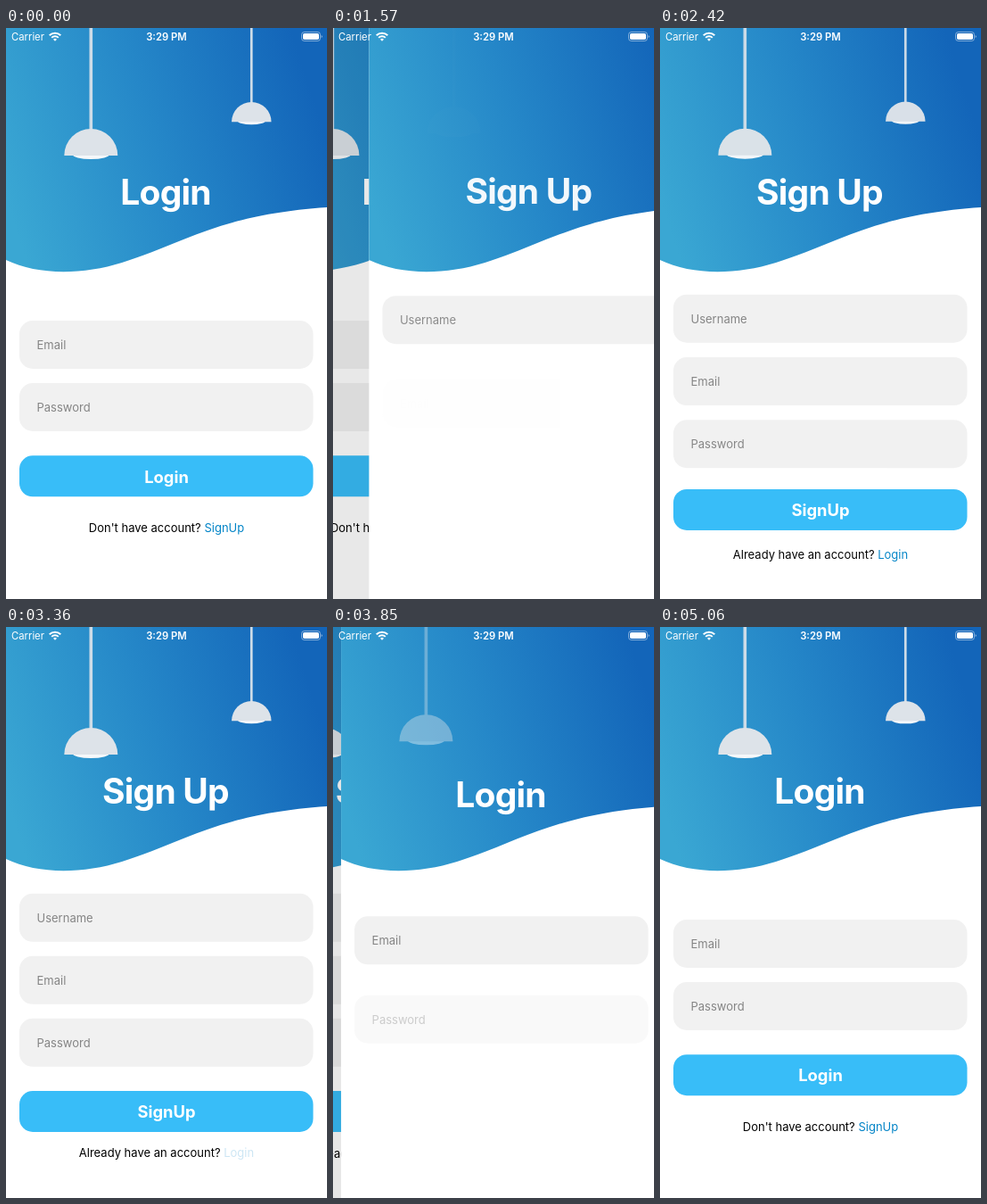
An HTML page for the animation above (5.11 s loop, 360 px wide and 640 px high).

```html
<!DOCTYPE html>
<html lang="en">
<head>
<meta charset="utf-8">
<title>Login and sign up</title>
<style>
  html, body { margin: 0; height: 100%; overflow: hidden; background: #fff; }
  svg { display: block; width: 100%; height: 100%; font: 13px Inter, "Noto Sans", sans-serif; }
  .middle { text-anchor: middle; }
  .title { font-size: 39px; font-weight: 700; letter-spacing: -.8px; fill: #fff; }
  .button { font-size: 18.4px; font-weight: 700; fill: #fff; }
  .placeholder { fill: #858585; }
  .link { fill: #0284c7; }
  .status { font-size: 11.3px; fill: #fff; }
</style>
</head>
<body>
<svg id="stage" viewBox="0 0 360 640">
  <defs>
    <linearGradient id="sky" gradientUnits="userSpaceOnUse" x1="0" y1="190" x2="345" y2="80">
      <stop offset="0" stop-color="#3aa7d3"/>
      <stop offset=".5" stop-color="#2587c8"/>
      <stop offset="1" stop-color="#1365b9"/>
    </linearGradient>
    <g id="shade">
      <ellipse cy="28.5" rx="21" ry="5.5" fill="#f6f8fa"/>
      <path d="M-30 30A30 30 0 0 1 30 30Z" fill="#dde3e9"/>
    </g>
  </defs>
  <g id="pages"></g>
  <g class="status">
    <text x="6" y="14">Carrier</text>
    <text class="middle" x="180" y="14" font-weight="600">3:29 PM</text>
    <g fill="none" stroke="#fff" stroke-width="2">
      <path d="M48.7 8.3a9 9 0 0 1 12.6 0M51.2 10.9a5.4 5.4 0 0 1 7.6 0"/>
    </g>
    <path d="M55 14.8l-2-2.1a2.9 2.9 0 0 1 4 0z"/>
    <rect x="331.5" y="4.5" width="21" height="10" rx="3" fill="none" stroke="#fff" stroke-opacity=".45"/>
    <rect x="333" y="6" width="18" height="7" rx="1.8"/>
    <path d="M353.6 8v3q1.2-.5 1.2-1.5t-1.2-1.5z" fill-opacity=".5"/>
  </g>
</svg>
<script>
const LOOP = 5110;
const STAGGER = 210;
const PUSH_SIGNUP = { mount: 1345, slide: 1362 };
const PUSH_LOGIN = { mount: 3527, slide: 3541 };
const PRESS = { login: 1130, signup: 3200 };

// Screen refreshes as [first, count, step] in ms
const refreshes = [
  [0, 1, 0], [790, 1, 0], [1180, 1, 0], [1350, 5, 110], [1890, 5, 107.5],
  [2420, 6, 100], [3020, 2, 100], [3360, 1, 0], [3640, 2, 110], [3850, 2, 110],
  [4080, 1, 0], [4190, 5, 117.5], [4760, 4, 100]
].flatMap(([first, count, step]) => Array.from({ length: count }, (_, i) => first + i * step));

const clamp = v => Math.min(1, Math.max(0, v));

// An entering part: `from` is its starting vertical offset, `order` its place in the stagger
const part = (from, order, content) =>
  `<g class="part" data-from="${from}" data-order="${order}">${content}</g>`;

const lamp = (x, y, scale, order) => part(-25, order,
  `<rect x="${x - 1.8 * scale}" width="${3.6 * scale}" height="${y + 1}" fill="#cddce8"/>
   <use href="#shade" transform="translate(${x} ${y}) scale(${scale})"/>`);

const box = (y, height, fill) =>
  `<rect x="15" y="${y}" width="329.5" height="${height}" rx="15" fill="${fill}"/>`;

function createPage({ title, fields, firstField, action, actionY, prompt, link, promptY }) {
  const page = document.createElementNS("http://www.w3.org/2000/svg", "g");
  const inputs = fields.map((name, i) => {
    const y = firstField + i * 70;
    return part(25, i, box(y, 54, "#f1f1f1") +
      `<text class="placeholder" x="34.5" y="${y + 32}">${name}</text>`);
  }).join("");
  page.innerHTML = `
    <rect width="360" height="640" fill="#fff"/>
    <path d="M0 0V260C35 277 85 277 130 263C200 241 240 209 360 201V0Z" fill="url(#sky)"/>
    ${lamp(95.3, 113, 1, 1)}${lamp(275.3, 83, .742, 2)}
    ${part(-25, 0, `<text class="title middle" x="179" y="198">${title}</text>`)}
    ${inputs}
    ${part(25, fields.length, box(actionY, 46, "#38bdf8") +
      `<text class="button middle" x="180" y="${actionY + 30.3}">${action}</text>`)}
    ${part(25, fields.length + 1,
      `<text class="middle" x="180" y="${promptY}">${prompt} <tspan class="link">${link}</tspan></text>`)}
    <rect class="dim" width="360" height="640" opacity="0"/>`;
  return {
    root: page,
    parts: [...page.querySelectorAll(".part")],
    link: page.querySelector(".link"),
    dim: page.querySelector(".dim")
  };
}

const login = createPage({
  title: "Login", fields: ["Email", "Password"], firstField: 328,
  action: "Login", actionY: 479.3, prompt: "Don't have account?", link: "SignUp", promptY: 565
});
const signup = createPage({
  title: "Sign Up", fields: ["Username", "Email", "Password"], firstField: 298.8,
  action: "SignUp", actionY: 520, prompt: "Already have an account?", link: "Login", promptY: 594.5
});
const pages = document.getElementById("pages");
pages.append(login.root, signup.root);

// Underdamped spring: stiffness 100, damping 10, mass 1
function spring(ms) {
  if (ms <= 0) return 0;
  const s = ms / 1000, w = Math.sqrt(75);
  return 1 - Math.exp(-5 * s) * (Math.cos(w * s) + 5 / w * Math.sin(w * s));
}

// Critically damped slide of a pushed page
function slide(ms) {
  const p = 18 * Math.max(0, ms) / 1000;
  return p > 10 ? 1 : 1 - (1 + p) * Math.exp(-p);
}

function enter(page, elapsed) {
  for (const el of page.parts) {
    const progress = spring(elapsed - el.dataset.order * STAGGER);
    el.setAttribute("transform", `translate(0 ${el.dataset.from * (1 - progress)})`);
    el.setAttribute("opacity", clamp(progress));
  }
}

function press(page, elapsed) {
  const p = clamp(elapsed / 150);
  const eased = p < .5 ? 2 * p * p : 1 - 2 * (1 - p) ** 2;
  page.link.setAttribute("fill-opacity", 1 - .8 * eased);
}

function place(page, x, dim) {
  page.root.setAttribute("transform", `translate(${x} 0)`);
  page.dim.setAttribute("opacity", dim);
}

function render(t) {
  const returning = t >= PUSH_LOGIN.mount;
  const [top, under] = returning ? [login, signup] : [signup, login];
  const progress = slide(t - (returning ? PUSH_LOGIN : PUSH_SIGNUP).slide);

  if (pages.lastChild !== top.root) pages.append(top.root);
  place(under, -108 * progress, .1 * progress);
  place(top, 360 * (1 - progress), 0);

  enter(login, returning ? t - PUSH_LOGIN.mount : 1e4);
  enter(signup, t - PUSH_SIGNUP.mount);
  press(login, returning ? 0 : t - PRESS.login);
  press(signup, t - PRESS.signup);
}

const start = performance.now();
function tick() {
  const t = (performance.now() - start) % LOOP;
  render(refreshes.findLast(time => time <= t));
  requestAnimationFrame(tick);
}
tick();
</script>
</body>
</html>
```
